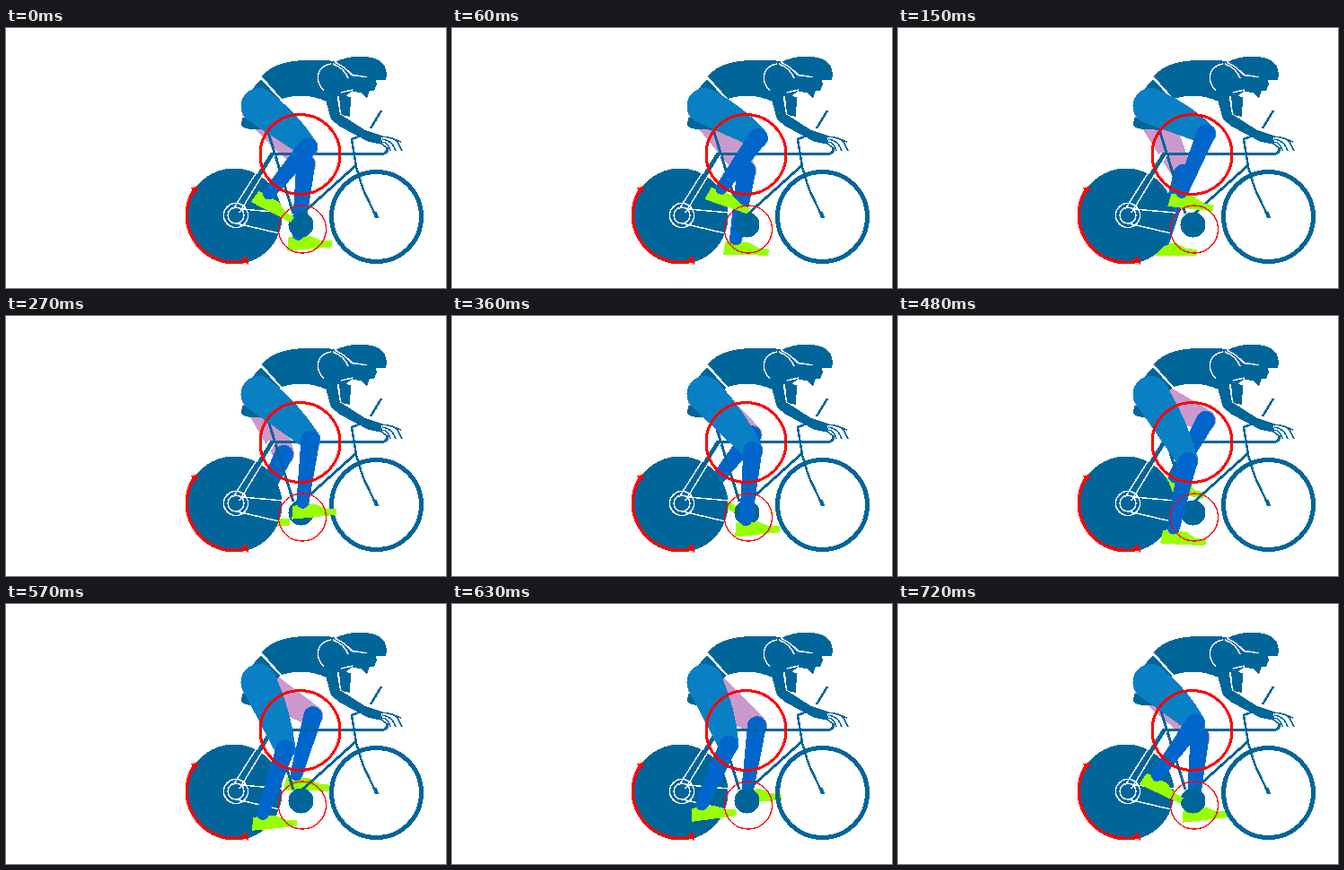
Recreate the animation shown at these times as an HTML page. Size 490 by 290 pixels, loop 750 ms.

```html
<!DOCTYPE html>
<html lang="en">
<head>
<meta charset="utf-8">
<title>Cyclist</title>
<style>
html, body { margin: 0; width: 100%; height: 100%; overflow: hidden; background: #fff; }
svg { display: block; width: 490px; height: 290px; shape-rendering: crispEdges; }
.fill { fill: #069; }
.tube, .edge, .red { fill: none; stroke: #069; stroke-width: 3; }
.edge { stroke: #fff; stroke-width: 1.5; }
.red { stroke: #f00; }
</style>
</head>
<body>
<svg viewBox="0 0 490 290">
  <g id="far"></g>

  <g id="bike">
    <circle class="fill" cx="254" cy="210" r="53.5"/>
    <circle class="tube" cx="412.5" cy="210.5" r="50" style="stroke-width:5"/>
    <circle class="fill" cx="328.5" cy="219.5" r="14"/>
    <path class="tube" d="M296 140.5H419Q425 140 425 133M390 153L330 207"/>
    <path class="tube" d="M290 110L320 207"/>
    <path class="tube" style="stroke-width:2.5" d="M398 119L385 124L390 155Q396 178 402 189L412 210M406 112L418 92"/>
    <path class="fill" d="M409 206L413 205L415 212L411 212Z"/>
    <path class="tube" style="stroke-width:5" d="M257 204L297 140"/>
    <path class="edge" d="M253 202L293 139M260 206L299 142M263 202L309 206M257 218L304 229"/>
    <circle class="edge" cx="256" cy="209" r="13.5"/>
    <circle class="edge" cx="256" cy="209" r="9"/>
    <path class="fill" d="M263 100L286 97L291 114L280 113Q268 114 262 109Z"/>
  </g>

  <g id="rider">
    <path class="fill" d="M284 57L305 80L296 90L268 78Q276 65 284 57Z"/>
    <path class="fill" d="M285 54Q296 40 320 37Q345 34 366 37L384 48L390 67L378 76L384 77L383 99L373 97L371 76L357 82Q333 71 307 79Z"/>
    <path class="fill" d="M352 66L374 72L369 79L372 96L400 114L418 120L419 130L404 127L372 110L362 102Z"/>
    <path class="fill" d="M379 53L411 56L413 63L410 70L405 70L402 79L395 72L386 71Z"/>
    <path class="fill" d="M367 38Q378 32 394 31.5Q416 32 422 43Q425 50 423 58L412 58Q398 52 384 52Z"/>
    <path class="edge" d="M284 55L306 80M366 38Q377 43 386 53M362 40C344 43 344 62 354 69M364 40Q377 45 381 56M373 72L386 69M370 76Q371 90 373 97"/>
    <path class="tube" style="stroke-width:1.5" d="M418 121Q432 122 436 127L441 137M419 124Q430 125 434 137M418 127Q426 127 428 137M418 129L426 135M430 123L440 127"/>
  </g>

  <g id="near"></g>

  <g class="red">
    <circle cx="327.5" cy="141" r="44.5"/>
    <circle cx="330" cy="224.5" r="26.5" style="stroke-width:1.3"/>
    <path style="stroke-width:3.5" d="M209 181A53 53 0 0 0 267 260"/>
    <path style="stroke:none;fill:#f00" d="M205 178L214 177L212 185ZM262 257L269 255L270 264Z"/>
  </g>
</svg>
<script>
const LOOP = 750, STEPS = 25;

// [step, knee x, knee y, foot tilt in degrees]
const POSES = [
  [0, 336, 133, 33], [4, 343, 116, 16], [9, 339, 138, 0], [12, 335, 150, 0],
  [16, 323, 162, 9], [21, 308, 157, -2], [24, 331, 133, 31]
];

const poseAt = i => {
  const n = POSES.length, lap = Math.floor(i / n);
  const [step, ...rest] = POSES[i - lap * n];
  return [step + lap * STEPS, ...rest];
};

// Periodic cubic interpolation through the poses
function pose(step) {
  let i = 0;
  while (poseAt(i + 1)[0] <= step) i++;
  const [a, b, c, d] = [-1, 0, 1, 2].map(k => poseAt(i + k));
  const span = c[0] - b[0], u = (step - b[0]) / span;
  return [1, 2, 3].map(k => {
    const m0 = (c[k] - a[k]) / (c[0] - a[0]) * span;
    const m1 = (d[k] - b[k]) / (d[0] - b[0]) * span;
    return b[k] + u * m0 + u * u * (3 * (c[k] - b[k]) - 2 * m0 - m1)
      + u * u * u * (2 * (b[k] - c[k]) + m0 + m1);
  });
}

// Outline around two circles of different radius, with a bulging front edge
function limb([ax, ay], ra, [bx, by], rb, bulge = 0) {
  const dir = Math.atan2(by - ay, bx - ax);
  const open = Math.acos((ra - rb) / Math.hypot(bx - ax, by - ay));
  const at = (x, y, r, t) => `${x + r * Math.cos(t)} ${y + r * Math.sin(t)}`;
  const middle = at((ax + bx) / 2, (ay + by) / 2, (ra + rb) / 2 + bulge, dir - open);
  return `M${at(ax, ay, ra, dir + open)}A${ra} ${ra} 0 1 1 ${at(ax, ay, ra, dir - open)}`
    + `Q${middle} ${at(bx, by, rb, dir - open)}`
    + `A${rb} ${rb} 0 0 1 ${at(bx, by, rb, dir + open)}Z`;
}

function makeLeg(id, hip, thighColor, bulge) {
  const [thigh, shoe, shin] = [thighColor, '#9f0', '#06c'].map(color => {
    const path = document.createElementNS('http://www.w3.org/2000/svg', 'path');
    path.setAttribute('fill', color);
    return document.getElementById(id).appendChild(path);
  });
  shoe.setAttribute('d', 'M-37 -7L-24 -8L-12 -9L0 -4L12 -4L12 3L-8 5L-17 6L-38 8Z');

  return step => {
    const [kx, ky, tilt] = pose(step);
    const crank = (step / STEPS * 360 - 142) * Math.PI / 180;
    const px = 330 + 27 * Math.cos(crank), py = 224.5 + 27 * Math.sin(crank);
    const c = Math.cos(tilt * Math.PI / 180), s = Math.sin(tilt * Math.PI / 180);
    const ankle = [px - 26 * c + 11 * s, py - 26 * s - 11 * c];
    thigh.setAttribute('d', limb(hip, 20, [kx, ky], 11.5, bulge));
    shin.setAttribute('d', limb([kx, ky], 10.5, ankle, 7));
    shoe.setAttribute('transform', `translate(${px} ${py}) rotate(${tilt})`);
  };
}

const farLeg = makeLeg('far', [282, 90], '#c9c', 0);
const nearLeg = makeLeg('near', [281.5, 87], '#0a80c4', 6);

function draw() {
  const step = Math.floor(performance.now() % LOOP / LOOP * STEPS);
  nearLeg(step);
  farLeg((step + STEPS / 2) % STEPS);
  requestAnimationFrame(draw);
}
draw();
</script>
</body>
</html>
```
